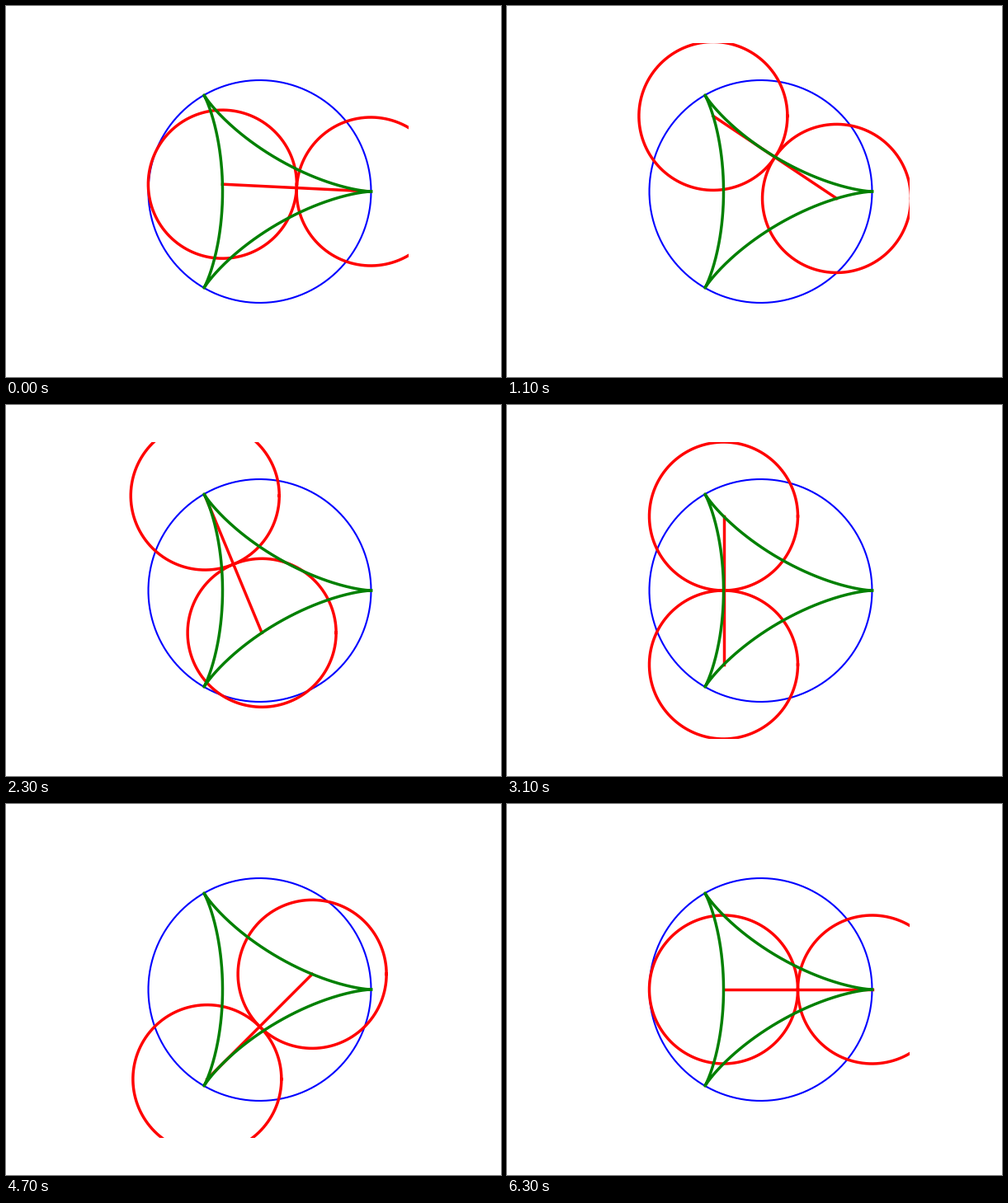
Recreate the animation shown at these times as a matplotlib script. Size 600 by 450 pixels, loop 6.4 s.

```python
import numpy as np
import matplotlib.pyplot as plt
from matplotlib.animation import FuncAnimation

FRAMES = 64
INTERVAL = 100

fig = plt.figure(figsize=(6, 4.5), dpi=100, facecolor="white")
ax = fig.add_axes([0.125, 0.1, 0.775, 0.8])
ax.set_aspect("equal")
ax.set_xlim(-4, 4)
ax.set_ylim(-4, 4)
ax.axis("off")

turn = np.linspace(0, 2 * np.pi, 400)


def deltoid(t):
    return 2 * np.cos(t) + np.cos(2 * t), 2 * np.sin(t) - np.sin(2 * t)


def circle(x, y, r):
    return x + r * np.cos(turn), y + r * np.sin(turn)


ax.plot(*circle(0, 0, 3), color="blue", lw=1.5)
rings = [ax.plot([], [], color="red", lw=2.5)[0] for _ in range(2)]
rod, = ax.plot([], [], color="red", lw=2.5)
ax.plot(*deltoid(turn), color="green", lw=2.5)


def update(i):
    # The rod is a tangent chord of constant length; both ends ride the curve.
    s = -np.pi * (i + 1) / FRAMES
    ends = [deltoid(s), deltoid(s + np.pi)]
    rod.set_data(*zip(*ends))
    for ring, (x, y) in zip(rings, ends):
        ring.set_data(*circle(x, y, 2))
    return [rod, *rings]


def init():
    return update(0)


anim = FuncAnimation(fig, update, frames=FRAMES, init_func=init,
                     interval=INTERVAL, repeat=True, repeat_delay=0)
plt.show()
```
